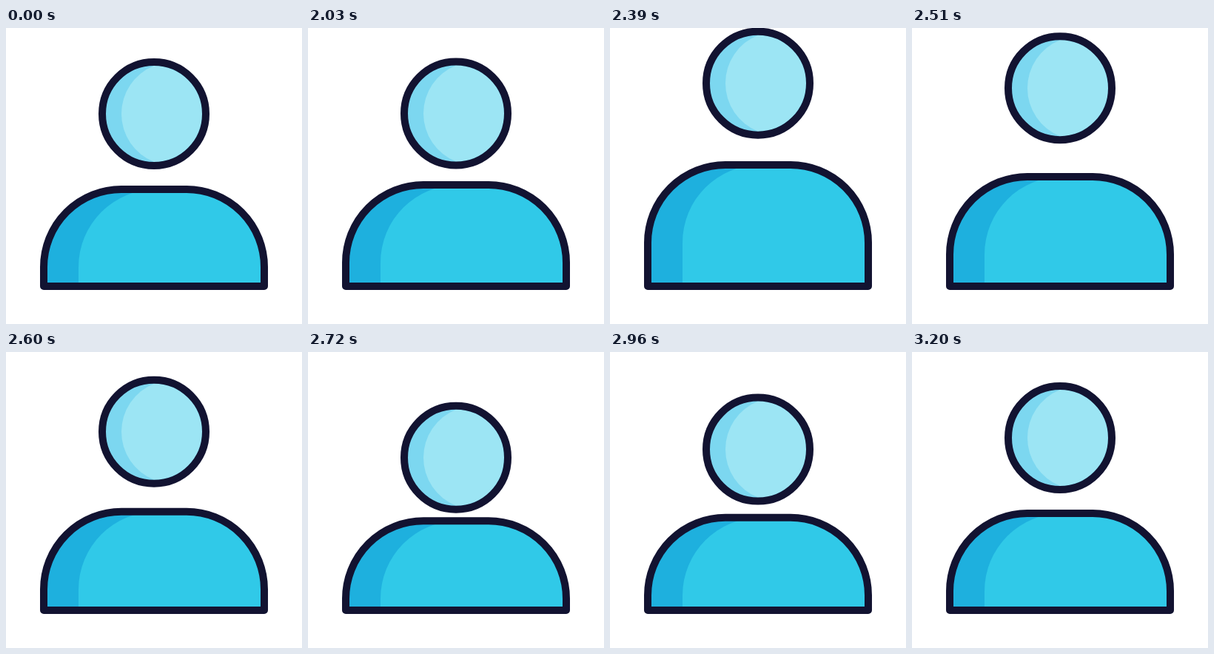
An HTML page that plays this animation: 400 px wide and 400 px high, repeating every 3.23 s.

```html
<!DOCTYPE html>
<html lang="en">
<head>
<meta charset="utf-8">
<title>Avatar jump</title>
<style>
  html, body { margin: 0; height: 100%; overflow: hidden; background: #fff; }
  svg { display: block; width: 100%; height: 100%; }
  .line { fill: none; stroke: #121331; stroke-width: 10; stroke-linejoin: round; }
</style>
</head>
<body>
<svg viewBox="0 0 400 400">
  <g id="head">
    <circle cx="200" r="70" fill="#7cd7f0"/>
    <path d="M200-65A65 65 0 0 1 200 65A70 70 0 0 1 200-65Z" fill="#9ce5f4"/>
    <circle class="line" cx="200" r="70"/>
  </g>
  <path id="shade" fill="#1eb0de"/>
  <path id="front" fill="#30c9e8"/>
  <path id="outline" class="line"/>
</svg>
<script>
const LOOP = 3230, START = 2000, STEP = 30;
const $ = id => document.getElementById(id);

// Cubic Bezier easing, solved by bisection
const bezier = (x1, y1, x2, y2) => {
  const at = (a, b, s) => 3 * (1 - s) ** 2 * s * a + 3 * (1 - s) * s * s * b + s ** 3;
  return x => {
    let lo = 0, hi = 1;
    for (let i = 0; i < 24; i++) {
      const mid = (lo + hi) / 2;
      if (at(x1, x2, mid) < x) lo = mid; else hi = mid;
    }
    return at(y1, y2, lo);
  };
};

const smooth = bezier(.333, 0, .667, 1);
const settle = bezier(.333, 0, .48, 1);

// Each key: time, value, easing towards it
const headKeys = [[2000, 116], [2442, 73, smooth], [2774, 148, smooth], [3200, 116, settle]];
const bodyKeys = [
  [2000, 218],
  [2442, 184.4, bezier(.167, .55, .667, 1)],
  [2774, 230, bezier(.167, .4, .667, 1)],
  [3200, 218, settle]
];

function valueAt(keys, t) {
  if (t <= keys[0][0]) return keys[0][1];
  for (let i = 1; i < keys.length; i++) {
    const [t0, v0] = keys[i - 1], [t1, v1, ease] = keys[i];
    if (t < t1) return v0 + (v1 - v0) * ease((t - t0) / (t1 - t0));
  }
  return keys[keys.length - 1][1];
}

const torso = (left, top) =>
  `M${left} 349V${top + 105}a105 105 0 0 1 105-105H244a105 105 0 0 1 105 105V349Z`;

function draw(now) {
  const t = now % LOOP;
  const stepped = START + Math.floor((t - START) / STEP + 1e-6) * STEP;
  const top = valueAt(bodyKeys, stepped);
  $('head').setAttribute('transform', `translate(0 ${valueAt(headKeys, stepped)})`);
  $('shade').setAttribute('d', torso(51, top));
  $('front').setAttribute('d', torso(98, top));
  $('outline').setAttribute('d', torso(51, top));
}

const begin = performance.now();
function tick() {
  draw(performance.now() - begin);
  requestAnimationFrame(tick);
}
tick();
</script>
</body>
</html>
```
